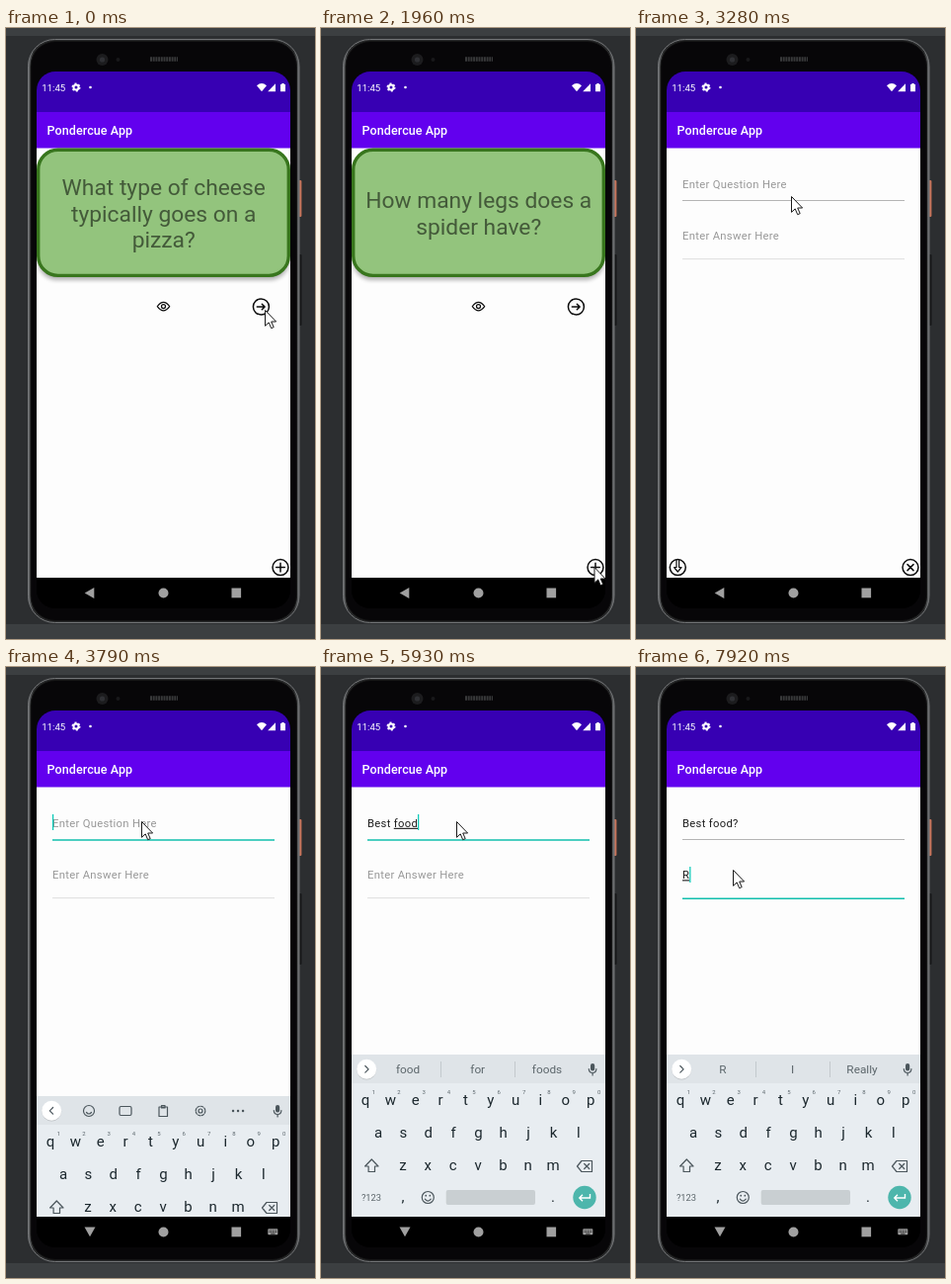
Write an HTML page that moves like this. It is 313 px wide and 618 px high and loops after 8000 ms.

```html
<!DOCTYPE html>
<html lang="en">
<head>
<meta charset="utf-8">
<title>Study cards</title>
<style>
  html, body { margin: 0; width: 100%; height: 100%; overflow: hidden; background: #2c2e30; }
  svg { display: block; width: 100vw; height: 100vh; }
  text { font-family: Roboto, "Noto Sans", sans-serif; white-space: pre; }
  .mid { text-anchor: middle; }
  .title { font-size: 12.5px; font-weight: 500; fill: #fff; letter-spacing: .1px; }
  .card { font-size: 22.8px; fill: #000; fill-opacity: .54; }
  .field { font-size: 11.25px; letter-spacing: .3px; fill: #1e1e1e; }
  .hint { fill: #989898; }
  .word { text-decoration: underline; }
  .key { font-size: 15px; fill: #1c282e; }
  .num { font-size: 6px; fill: #5d686e; }
  .tip { font-size: 11.8px; fill: #5c666b; }
  .ico { fill: none; stroke: #0c0c0c; stroke-width: 1.5; stroke-linecap: round; stroke-linejoin: round; }
  .grey { fill: none; stroke: #4b565c; stroke-width: 1.2; stroke-linejoin: round; stroke-linecap: round; }
</style>
</head>
<body>
<svg viewBox="0 0 313 618" preserveAspectRatio="none">
  <defs>
    <clipPath id="glass"><rect x="31" y="44" width="257" height="543" rx="19"/></clipPath>
    <clipPath id="above"><rect x="31" y="44" width="257" height="512"/></clipPath>
    <filter id="soft" x="-10%" y="-10%" width="120%" height="130%"><feGaussianBlur stdDeviation="2.2"/></filter>
    <linearGradient id="rim">
      <stop offset="0" stop-color="#6f7173"/><stop offset=".02" stop-color="#2a2b2c"/>
      <stop offset=".98" stop-color="#2a2b2c"/><stop offset="1" stop-color="#6a6c6e"/>
    </linearGradient>
    <g id="page">
      <rect x="31" y="44" width="257" height="543"/>
      <rect x="31" y="121" width="257" height="435" fill="#fdfdfd"/>
      <rect x="31" y="44" width="257" height="42" fill="#3700b3"/>
      <rect x="31" y="85" width="257" height="36.5" fill="#6200ee"/>
      <text class="title" x="41.5" y="108">Pondercue App</text>
    </g>
  </defs>

  <!-- desk and phone body -->
  <rect width="313" height="618" fill="#2c2e30"/>
  <rect width="313" height="8" fill="#3c3f41"/>
  <rect y="603" width="313" height="15" fill="#3c3f41"/>
  <rect x="296" y="154" width="3.4" height="37" rx="1" fill="#c9745a"/>
  <rect x="296" y="229" width="3.4" height="72" rx="1" fill="#151617"/>
  <rect x="22.5" y="11.5" width="274.5" height="590" rx="27" fill="url(#rim)" stroke="#727476"/>
  <rect x="25" y="13.5" width="269.5" height="586" rx="25" fill="#070608" stroke="#151515"/>
  <circle cx="97.5" cy="32" r="6" fill="#1c1c1e"/>
  <circle cx="97.5" cy="32" r="2.6" fill="#2f3034"/>
  <circle cx="113.5" cy="32" r="2" fill="#18181a"/>
  <path d="M146 31.5H174" stroke="#38393a" stroke-width="4.5" stroke-dasharray="2 .7"/>

  <g clip-path="url(#glass)">
    <rect x="31" y="44" width="257" height="543"/>
    <g id="main">
      <use href="#page"/>
      <rect x="32" y="128" width="255" height="127" rx="20" opacity=".3" filter="url(#soft)"/>
      <rect x="32.7" y="123.2" width="253.6" height="127.2" rx="20" fill="#93c47d" stroke="#38761d" stroke-width="3.4"/>
      <g id="pizza" class="card mid">
        <text x="159.7" y="169">What type of cheese</text>
        <text x="159.7" y="195.7">typically goes on a</text>
        <text x="159.7" y="222.4">pizza?</text>
      </g>
      <g id="spider" class="card mid">
        <text x="159.7" y="182.3">How many legs does a</text>
        <text x="159.7" y="209">spider have?</text>
      </g>
      <g class="ico">
        <path d="M153.3 281.6Q159.5 273.2 165.7 281.6Q159.5 290 153.3 281.6Z" stroke-width="1.2"/>
        <circle cx="159.5" cy="281.6" r="2" stroke-width="1.2"/>
        <circle cx="258.4" cy="282" r="8"/>
        <path d="M254.3 282H262M259.3 279.2L262.1 282L259.3 284.8"/>
        <circle cx="278" cy="545.6" r="8"/>
        <path d="M273.7 545.6H282.3M278 541.3V549.9"/>
      </g>
    </g>

    <g id="add">
      <use href="#page"/>
      <path id="line0" d="M47 174.5H272"/>
      <path id="line1" d="M47 233.7H272"/>
      <text id="hint0" class="field hint" x="47" y="161.8">Enter Question Here</text>
      <text id="hint1" class="field hint" x="47" y="214.3">Enter Answer Here</text>
      <text id="text0" class="field" x="47" y="161.8"><tspan></tspan><tspan class="word"></tspan></text>
      <text id="text1" class="field" x="47" y="214.3"><tspan></tspan><tspan class="word"></tspan></text>
      <rect id="caret" width="1.2" height="16" fill="#03c9b6"/>
      <g class="ico">
        <circle cx="42.3" cy="545.6" r="8"/>
        <path d="M41 538V545.5H38.6L42.3 550L46 545.5H43.6V538" stroke-width="1.2"/>
        <circle cx="278" cy="545.6" r="8"/>
        <path d="M275 542.6L281 548.6M281 542.6L275 548.6"/>
      </g>
    </g>

    <g clip-path="url(#above)">
      <g id="board">
        <rect x="31" y="392" width="257" height="166" fill="#e8edf1"/>
        <rect x="31" y="392" width="257" height="29" fill="#dfe4e8"/>
        <circle cx="46.2" cy="407.5" r="10" opacity=".15"/>
        <circle cx="46.2" cy="406.8" r="10" fill="#fff"/>
        <path id="chev" class="grey"/>
        <g id="tips">
          <path d="M121.5 399V415M196.5 399V415" stroke="#c3c9cd"/>
          <text class="tip mid" x="88" y="411"></text>
          <text class="tip mid" x="158.7" y="411"></text>
          <text class="tip mid" x="229" y="411"></text>
        </g>
        <g id="tools" class="grey">
          <circle cx="84" cy="407" r="5.5"/><path d="M81.5 408.5Q84 411.5 86.5 408.5"/>
          <rect x="115" y="402.5" width="12" height="9" rx="1.5"/>
          <path d="M155 403H163.500V412.500H155ZM157.500 401.500H161V404H157.500Z"/>
          <circle cx="197" cy="407" r="2"/><circle cx="197" cy="407" r="4.8" stroke-dasharray="2.4 1.37"/>
          <path d="M230 407H230.1M235 407H235.1M240 407H240.1" stroke-width="2.4"/>
        </g>
        <rect x="273" y="401" width="4.2" height="7.6" rx="2.1" fill="#4b565c"/>
        <path class="grey" d="M271.300 406.500Q271.500 410.500 275.100 410.500Q278.700 410.500 278.900 406.500M275.100 410.500V413"/>
        <g id="keys"></g>
        <g class="grey">
          <path d="M51.300 498L58 505H54.500V510.500H48.100V505H44.600Z"/>
          <path d="M259.500 505L264 499.500H274.500V510.500H264ZM266.700 502.500L271.700 507.500M271.700 502.500L266.700 507.500"/>
          <circle cx="108.300" cy="536.500" r="6"/>
          <path d="M105.300 538.200Q108.300 542 111.300 538.200"/>
          <path d="M106.200 534.700H106.300M110.300 534.700H110.400" stroke-width="1.7"/>
        </g>
        <rect x="126.700" y="529" width="90.300" height="15" rx="2" fill="#c9cfd2"/>
        <circle cx="267" cy="536.500" r="11.700" fill="#4db6ac"/>
        <path d="M272.500 533V537H262M265 533.800L261.800 537L265 540.200" fill="none" stroke="#fff" stroke-width="1.4"/>
      </g>
    </g>

    <!-- system icons -->
    <text x="36.300" y="63.800" font-size="9.600" fill="#fff">11:45</text>
    <g fill="#fff">
      <circle cx="71" cy="60" r="2.500" fill="none" stroke="#fff" stroke-width="2"/>
      <circle cx="71" cy="60" r="3.800" fill="none" stroke="#fff" stroke-width="1.400" stroke-dasharray="1.990"/>
      <circle cx="85.500" cy="60" r="1.300"/>
      <path d="M254 58.300Q259 53.800 264 58.300L259 64.300Z"/>
      <path d="M265.200 64.200L273 56.200V64.200Z"/>
      <path d="M278 57H279.300V56H281.700V57H283V64.300H278Z"/>
    </g>
    <g fill="#a0a0a0">
      <path id="back"/>
      <circle cx="159.500" cy="571.500" r="5"/>
      <rect x="228.500" y="566.500" width="9.600" height="9.800"/>
      <g id="ime">
        <rect x="265.300" y="568.300" width="10" height="6" rx=".8"/>
        <path d="M266.500 570H274.500M266.500 571.600H274.500" stroke="#000" stroke-width=".8" stroke-dasharray="1 .7"/>
        <path d="M268.200 573.200H272.500" stroke="#000" stroke-width=".7"/>
      </g>
    </g>
  </g>

  <path id="mouse" d="M.5 .5V16.300L4.200 12.900L6.700 18.700L9.200 17.600L6.700 12H11.600Z" fill="#fff" stroke="#1a1a1a" stroke-width="1"/>
</svg>

<script>
const LOOP = 8000;
const $ = id => document.getElementById(id);
const show = (id, on) => $(id).style.display = on ? '' : 'none';
const set = (id, attrs) => { for (const k in attrs) $(id).setAttribute(k, attrs[k]); };

// Each track is a list of [start time, ...values]; the latest started entry holds.
const at = (track, t) => track.filter(e => e[0] <= t).pop();

const mouse = [
  [0, 262, 285], [1150, 248, 274], [1300, 262, 455], [1450, 259, 505],
  [1700, 266, 528], [1820, 272, 543], [1960, 276.5, 545], [2500, 279, 548],
  [2770, 268, 515], [2890, 250, 436], [3040, 215, 330], [3160, 182, 232],
  [3280, 157, 170], [3400, 147, 161], [3520, 140, 155], [3640, 137, 153],
  [3790, 137, 156], [7000, 127, 165], [7120, 115, 180], [7240, 105, 191],
  [7390, 98, 205]
];
// main scale, add scale, add opacity
const zoom = [[0, 1, 1, 0], [2500, 1.035, .953, .72], [2620, 1.07, .985, 1], [2770, 1.09, .997, 1], [2890, 1, 1, 1]];
// finished text, word being composed
const question = [
  [0, '', ''], [4580, '', 'B'], [4890, '', 'Be'], [5010, '', 'Bes'], [5130, '', 'Best'],
  [5250, 'Best ', ''], [5660, 'Best ', 'f'], [5780, 'Best ', 'foo'], [5930, 'Best ', 'food'],
  [6470, 'Best food?', '']
];
const answer = [[0, '', ''], [7920, '', 'R']];
const tips = [
  [0, ''], [4580, 'B Be But'], [4890, 'Be Best Because'], [5010, 'Best Bes Besides'],
  [5130, 'Best Beat Better'], [5250, 'way thing friend'], [5660, 'for f from'],
  [5780, 'food foot fool'], [5930, 'food for foods'], [6600, ''],
  [7630, 'I The What'], [7770, ''], [7920, 'R I Really']
];
const caret = [[0, 0], [3640, 1], [4180, 0], [4580, 1], [7000, 0], [7510, 1]];
const board = [[0, 170], [3790, 42], [3930, 0]];

function buildKeys() {
  const out = [];
  const key = (c, x, y, extra = 'class="key mid"') => out.push(`<text ${extra} x="${x}" y="${y}">${c}</text>`);
  const row = (chars, x, y) => [...chars].forEach((c, i) => key(c, x + 25.35 * i, y));
  row('qwertyuiop', 45, 443);
  row('asdfghjkl', 58, 476);
  row('zxcvbnm', 83, 509);
  [...'1234567890'].forEach((c, i) => key(c, 53.5 + 25.35 * i, 432, 'class="num mid"'));
  key(',', 83, 541);
  key('.', 235, 541);
  key('?123', 51, 540, 'class="tip mid" style="font-size:9.3px"');
  $('keys').innerHTML = out.join('');
}

function fill(n, track, t) {
  const [, done, word] = at(track, t), el = $('text' + n);
  el.children[0].textContent = done;
  el.children[1].textContent = word;
  show('hint' + n, !(done + word));
  return done + word ? el.getComputedTextLength() : 0;
}

function underline(n, active) {
  set('line' + n, {
    stroke: active ? '#12bfae' : n ? '#dedede' : '#b4b4b4',
    'stroke-width': active ? 1.5 : 1,
    transform: `translate(0 ${active ? .6 : 0})`
  });
}

const scaled = s => `translate(159.5 313) scale(${s}) translate(-159.5 -313)`;

function draw(t) {
  const [, x, y] = at(mouse, t);
  set('mouse', { transform: `translate(${x} ${y})` });

  const [, old, fresh, alpha] = at(zoom, t);
  show('main', t < 2890);
  show('add', alpha > 0);
  set('main', { transform: scaled(old) });
  set('add', { transform: scaled(fresh), opacity: alpha });
  show('pizza', t < 1030);
  show('spider', t >= 1030);

  const focus = t < 3640 ? -1 : t < 7510 ? 0 : 1;
  const widths = [fill(0, question, t), fill(1, answer, t)];
  underline(0, focus === 0);
  underline(1, focus === 1);
  show('caret', at(caret, t)[1]);
  if (focus >= 0) set('caret', { x: 47 + widths[focus], y: focus ? 202 : 149 });

  const typing = t >= 3790;
  show('board', typing);
  show('ime', typing);
  set('board', { transform: `translate(0 ${at(board, t)[1]})` });
  set('back', { d: typing ? 'M79.500 566.500H90.500L85 576.300Z' : 'M89.300 566V577L79.700 571.500Z' });

  const words = at(tips, t)[1];
  show('tips', words);
  show('tools', !words);
  set('chev', { d: words ? 'M44.800 403.500L48.100 406.800L44.800 410.100' : 'M47.600 403.500L44.300 406.800L47.600 410.100' });
  const slots = $('tips').querySelectorAll('text');
  words.split(' ').forEach((w, i) => slots[i].textContent = w);
}

buildKeys();
const start = performance.now();
function tick() {
  draw((performance.now() - start) % LOOP);
  requestAnimationFrame(tick);
}
tick();
</script>
</body>
</html>
```
